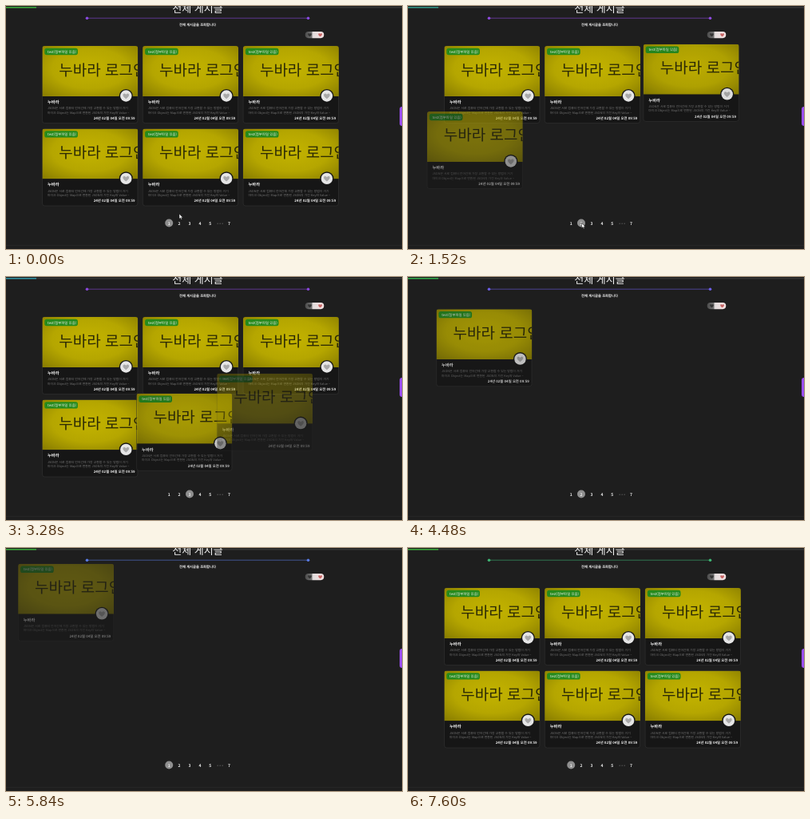
Write an HTML page that moves like this. It is 496 px wide and 304 px high and loops after 7.68 s.

```html
<!DOCTYPE html>
<html lang="ko">
<head>
<meta charset="utf-8">
<title>전체 게시글</title>
<style>
  html, body { margin: 0; width: 100%; height: 100%; overflow: hidden; background: #1e1e1e; }
  svg { display: block; width: 100vw; height: 100vh; }
  text { font-family: "Noto Sans CJK KR", "Noto Sans CJK", "Noto Sans", sans-serif; fill: #f2f2f2; text-rendering: geometricPrecision; }
  .mid { text-anchor: middle; }
  .end { text-anchor: end; }
  .bold { font-weight: 700; }
  .desc { font-size: 3.85px; fill: #747474; }
</style>
</head>
<body>
<svg viewBox="0 0 496 304" xmlns="http://www.w3.org/2000/svg">
  <defs>
    <radialGradient id="paper" cx=".5" cy=".45" r=".72">
      <stop offset="0" stop-color="#c3b300"/>
      <stop offset=".55" stop-color="#b5a600"/>
      <stop offset="1" stop-color="#8a7e00"/>
    </radialGradient>
    <linearGradient id="track">
      <stop offset="0" stop-color="#4c4c4c"/>
      <stop offset=".33" stop-color="#707070"/>
      <stop offset=".42" stop-color="#e2dcdc"/>
      <stop offset="1" stop-color="#f3dfdf"/>
    </linearGradient>
    <clipPath id="photo"><path d="M0 63V3a3 3 0 0 1 3-3H117a3 3 0 0 1 3 3V63Z"/></clipPath>
    <path id="heart" d="M0 3.5C-6 -.6 -3.6 -3.6 -1.7 -3.2Q-.5 -3 0 -1.9Q.5 -3 1.7 -3.2C3.6 -3.6 6 -.6 0 3.5Z"/>
    <g id="card">
      <rect x=".2" y=".2" width="119.4" height="96.4" rx="3" fill="#161616" stroke="#343434" stroke-width=".6"/>
      <g clip-path="url(#photo)">
        <rect width="120" height="63" fill="url(#paper)"/>
        <text x="21" y="36.5" font-size="19" font-weight="500" style="fill:#2b2905">누바라 로그인</text>
      </g>
      <rect x="3" y="2.8" width="41.6" height="8.4" rx="2.6" fill="#268a1c"/>
      <text x="6.8" y="8.6" font-size="4.4" font-weight="500">test(첨부파일 있음)</text>
      <circle cx="105" cy="62.5" r="8.6" fill="#161616"/>
      <circle cx="105" cy="62.5" r="7.2" fill="#e6e6e6"/>
      <use href="#heart" x="105" y="62.7" fill="#a9a9a9"/>
      <text class="bold" x="6.6" y="72" font-size="5.3">누바라</text>
      <text class="desc" x="6.6" y="79.2">JSON은 서로 컴퓨터 언어간에 가장 교환할 수 있는 방법이 거기</text>
      <text class="desc" x="6.6" y="84.6">마이크 Object는 Map으로 변환된 JSON의 가진 Key와 Value ~</text>
      <text class="end bold" x="116.3" y="92" font-size="4.35">24년 02월 04일 오전 09:59</text>
    </g>
  </defs>

  <rect width="496" height="304" fill="#1e1e1e"/>
  <rect y="1" width="496" height="1.6" fill="#343434"/>
  <rect id="bar" y="1" width="38" height="1.6"/>
  <rect y="299" width="496" height=".7" fill="#292929"/>

  <text class="mid" x="240" y="8" font-size="13">전체 게시글</text>
  <path id="rule" d="M102 15.2H379" stroke-width=".9" opacity=".65"/>
  <g id="dots"><circle cx="101.5" cy="15.2" r="1.8"/><circle cx="378.5" cy="15.2" r="1.8"/></g>
  <text class="mid bold" x="240" y="25" font-size="4.3">전체 게시글을 조회합니다</text>

  <rect x="374.7" y="32" width="23.6" height="8.2" rx="4.1" fill="url(#track)"/>
  <use href="#heart" transform="translate(380.5 36.2) scale(.6)" fill="#333"/>
  <use href="#heart" transform="translate(393.6 36.2) scale(.62)" fill="#c86464"/>
  <rect x="493" y="126" width="8" height="24" rx="3" fill="#9a4df2"/>

  <g id="cards"></g>
  <circle id="pill" cy="271.5" r="5" fill="#8f8f8f"/>
  <g id="pager" class="mid"></g>
  <path id="cursor" d="M0 0V6.2L1.5 5L2.5 7.2L3.5 6.8L2.6 4.7H4.5Z" fill="#fff" stroke="#111" stroke-width=".5"/>
</svg>
<script>
const LOOP = 7680, RISE = 460, SHIFT = 50;
const $ = id => document.getElementById(id);
const make = (tag, parent, attrs) => {
  const el = document.createElementNS('http://www.w3.org/2000/svg', tag);
  for (const k in attrs) el.setAttribute(k, attrs[k]);
  return parent.appendChild(el);
};

// at: click time, first: first card's start, gap: wait for the second, step: wait for the others
const visits = [
  { at: -9999, page: 1, first: -9000, gap: 200, step: 200 },
  { at: 640, page: 2, first: 737, gap: 200, step: 200 },
  { at: 2080, page: 3, first: 2157, gap: 204, step: 204 },
  { at: 4075, page: 2, first: 4196, gap: 290, step: 185 },
  { at: 5660, page: 1, first: 5720, gap: 200, step: 200 }
];
const barTints = [[0, 0x3aa63a], [1520, 0x2f9080], [2240, 0x2f9a94], [3280, 0x2f8fa0], [4480, 0x2fa84a], [5840, 0x3aa63a], [LOOP, 0x3aa63a]];
const ruleTints = [[0, 0x8a4be2], [1520, 0x8f4be0], [2240, 0x8a58e6], [3280, 0x8a48dc], [4480, 0x6c5ee6], [5840, 0x5a7be4], [7600, 0x3fb574], [LOOP, 0x3fb574]];
const path = [[0, 217, 260], [240, 217, 261], [560, 217.5, 271.5], [1620, 217.5, 271.5], [2000, 228, 271], [2600, 228, 271]];
const pageX = { 1: 204.2, 2: 217, 3: 230, 4: 243, 5: 255.8, '· · ·': 268, 7: 279.5 };

for (const label in pageX)
  make('text', $('pager'), { x: pageX[label], y: 273.5, 'font-size': 5, class: 'bold' }).textContent = label;

const cards = Array.from({ length: 6 }, (_, i) => ({
  x: 45.3 + (i % 3) * 125.8,
  y: 50 + Math.floor(i / 3) * 103.4,
  el: make('use', $('cards'), { href: '#card' })
}));

// cubic-bezier(0, 0, .58, 1)
function easeOut(p) {
  if (p <= 0) return 0;
  if (p >= 1) return 1;
  let lo = 0, hi = 1;
  for (let i = 0; i < 20; i++) {
    const s = (lo + hi) / 2;
    if (1.74 * s * s - .74 * s ** 3 < p) lo = s; else hi = s;
  }
  return 3 * lo * lo - 2 * lo ** 3;
}

function segment(keys, t) {
  let i = 0;
  while (i < keys.length - 2 && t >= keys[i + 1][0]) i++;
  const a = keys[i], b = keys[i + 1];
  return { a, b, k: Math.min(1, (t - a[0]) / (b[0] - a[0])) };
}
const mix = (a, b, k) => a + (b - a) * k;

function tint(keys, t) {
  const { a, b, k } = segment(keys, t);
  const parts = [16, 8, 0].map(s => Math.round(mix(a[1] >> s & 255, b[1] >> s & 255, k)));
  return `rgb(${parts})`;
}

function draw(t) {
  const visit = visits.filter(v => t >= v.at).pop();
  cards.forEach((card, i) => {
    const start = visit.first + (i ? visit.gap + (i - 1) * visit.step : 0);
    const k = easeOut((t - start) / RISE);
    const off = SHIFT * (k - 1);
    card.el.setAttribute('transform', `translate(${card.x + off} ${card.y + off})`);
    card.el.setAttribute('opacity', k);
  });
  $('pill').setAttribute('cx', pageX[visit.page]);
  $('bar').setAttribute('fill', tint(barTints, t));
  const color = tint(ruleTints, t);
  $('rule').setAttribute('stroke', color);
  $('dots').setAttribute('fill', color);

  const { a, b, k } = segment(path, t);
  $('cursor').setAttribute('transform', `translate(${mix(a[1], b[1], k)} ${mix(a[2], b[2], k)})`);
  $('cursor').setAttribute('visibility', t < 2600 ? 'visible' : 'hidden');
}

const begin = performance.now();
function tick() {
  draw((performance.now() - begin) % LOOP);
  requestAnimationFrame(tick);
}
tick();
</script>
</body>
</html>
```
